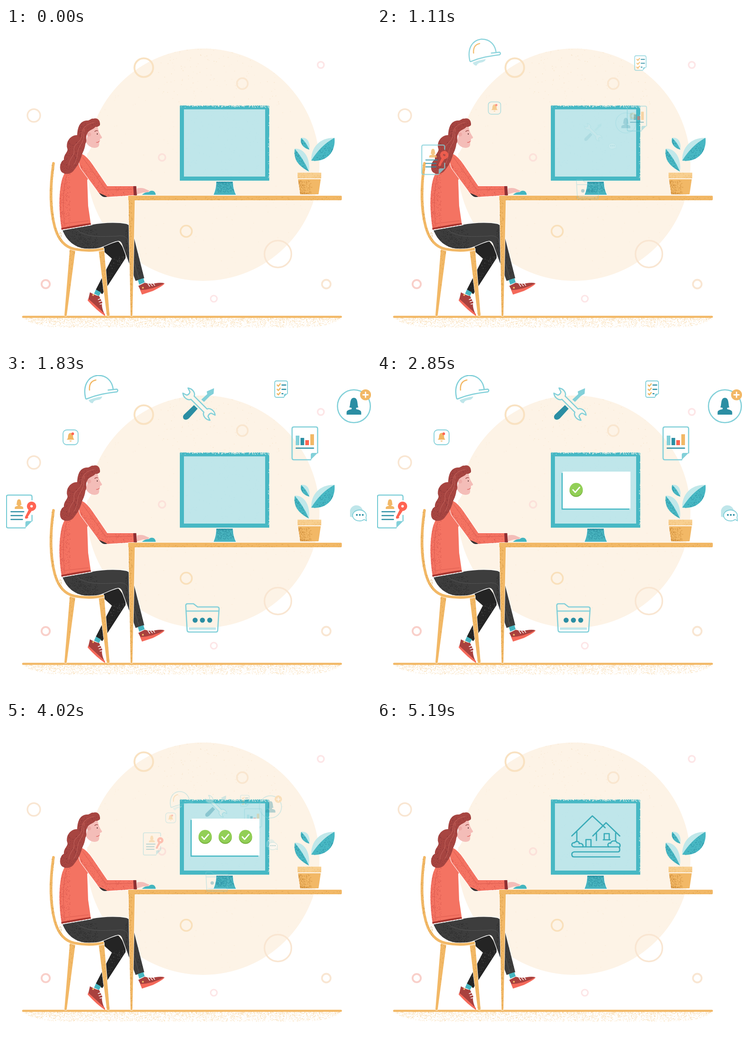
An HTML page with a canvas that plays this animation: 800x700 px, repeating every 6330 ms.

```html
<!DOCTYPE html>
<html lang="en">
<head>
<meta charset="utf-8">
<title>Working at a desk</title>
<style>
  html, body { margin: 0; width: 100%; height: 100%; overflow: hidden; background: #fff; }
  canvas, svg { position: absolute; left: 0; top: 0; width: 800px; height: 700px; }
  svg * { stroke-linecap: round; stroke-linejoin: round; }
  .line { fill: none; stroke: #82d0d9; stroke-width: 2.6; }
  .thin { stroke-width: 1.8; }
  .ink { fill: none; stroke: #2b8ea3; stroke-width: 2.6; }
  .teal { fill: #82d0d9; }
  .pale { fill: #bfe6ea; }
  .dark { fill: #2b8ea3; }
  .gold { fill: #f2b866; }
  .red { fill: #ff6452; }
  .goldline { fill: none; stroke: #f2b866; stroke-width: 2.6; }
  .white { fill: none; stroke: #fff; stroke-width: 2.8; }
  .check { fill: #92cf56; }
  .check-shade { fill: #78b33f; }
  .house { fill: none; stroke: #3aabb8; stroke-width: 2.7; }
</style>
</head>
<body>
<canvas id="scene" width="800" height="700"></canvas>
<svg viewBox="0 0 800 700">
  <g id="icons"></g>
  <g id="card">
    <path fill="#45b8c4" d="M404.500 215H553V295.500H404.500Z"/>
    <path fill="#fff" d="M407 212H555.500V293H407Z"/>
  </g>
  <g id="checks"></g>
  <g id="house" class="house">
    <path d="M427 250L472 206L500 232M438 241V262M473 250L502 221L532 250M481 244V260M523 244V260"/>
    <path d="M498 258V245H509V258M496 258.500H511M458 274V258H469V274"/>
    <path d="M433 274C425 274 425 264 433 265C436 260 444 262 443 267C449 265 453 270 451 274"/>
    <path d="M508 274C504 270 507 264 512 266C514 259 525 260 526 265C532 265 534 270 532 274"/>
    <path d="M433 274H529Q532 275 532 280Q532 285 528 285H432Q427 286 427 290.500Q427 296 432 296H532"/>
  </g>
</svg>
<script>
const LOOP = 6330, STEP = 30;
const ctx = document.getElementById('scene').getContext('2d');

let seed = 7;
const random = () => (seed = (seed * 16807) % 2147483647) / 2147483647;

function shape(d, color, edge = 0) {
  const path = new Path2D(d);
  if (edge) stroke(path, '#fff', edge);
  ctx.fillStyle = color;
  ctx.fill(path);
  return path;
}

function stroke(d, color, width) {
  ctx.strokeStyle = color;
  ctx.lineWidth = width;
  ctx.lineCap = ctx.lineJoin = 'round';
  ctx.stroke(d instanceof Path2D ? d : new Path2D(d));
}

// Specks inside a path, denser towards (x0, y0) as the biases grow.
function grain(path, color, count, [x0, y0, x1, y1], biasX = 1, biasY = 1, size = 1.3) {
  ctx.save();
  ctx.clip(path);
  ctx.fillStyle = color;
  for (let i = 0; i < count; i++) {
    const x = x0 + (x1 - x0) * random() ** biasX;
    const y = y0 + (y1 - y0) * random() ** biasY;
    const s = size * (0.6 + random() * 0.6);
    ctx.fillRect(x, y, s, s);
  }
  ctx.restore();
}

function drawBackdrop() {
  const disc = new Path2D();
  disc.arc(432, 300, 255, 0, 7);
  ctx.fillStyle = '#fdf3e6';
  ctx.fill(disc);
  grain(disc, '#faead6', 300, [177, 45, 687, 555]);
  grain(disc, '#f6e2c8', 170, [600, 45, 330, 170], 1, 1.7);

  const rings = [
    [302, 87, 20.5, 4, '#f9e2c2'], [518, 122, 12, 3.5, '#f9e6cf'], [61, 192, 14, 3.5, '#f9e6d2'],
    [690, 81, 7, 3.5, '#fde6e7'], [342, 284, 7.5, 3.5, '#fce1da'], [395, 446, 12.5, 3.6, '#f9e0bb'],
    [596, 496, 29.5, 3.5, '#f9e6d2'], [87, 562, 9, 4, '#f9d0ca'], [702, 562, 9.5, 3.8, '#f9e6d2'],
    [455.5, 594, 7, 3.2, '#fde6e7']
  ];
  for (const [x, y, r, width, color] of rings) {
    const ring = new Path2D();
    ring.arc(x, y, r, 0, 7);
    stroke(ring, color, width);
  }

  const shade = new Path2D('M36 636H736C720 650 690 657 650 657H120C80 657 50 648 36 636Z');
  grain(shade, '#f6d5a3', 3200, [36, 636, 736, 658], 1, 1.6, 1.1);
  stroke('M37.500 633.700H734', '#f2b866', 4.600);
}

function drawLegs() {
  const back = shape('M214 478L246 468Q264 488 262 505L211 584L197 574L232 506L214 490Z', '#242424');
  grain(back, '#505050', 260, [264, 500, 205, 590], 2);
  shape('M197 574L208 580L204 588L193 583Z', '#46b5c0');
  shape('M184 580Q196 587 204 588L211 602Q208 612 217 630L180 597Z', '#a9413e');
  stroke('M202 596L209 593M204 601L210 599M206 606L211 605', '#fff', 1.500);
  shape('M180 594Q196 608 217 628V632Q199 620 179 598Z', '#f4695a');
  shape('M191 584a2 2 0 1 0 .1 0Z', '#f2b866');

  const front = shape('M124 444L187 432C212 427 244 426 264 430Q275 434 278 450L303 549L284 555L264 500L254 473Q251 467 246 467C228 470 215 482 193 485C160 487 136 474 124 444Z', '#3d3d3d', 2.500);
  grain(front, '#2a2a2a', 420, [200, 488, 130, 440], 1, 2);
  grain(front, '#2a2a2a', 260, [262, 550, 300, 440], 2);
  stroke('M155 443C180 462 212 457 240 457Q262 453 266 464L291 549', '#555', 1);
  shape('M289 553L301 549L304 558L292 563Z', '#46b5c0');
  shape('M290 566L304 559Q317 563 328 560Q340 558 347 560Q336 570 296 578Z', '#a9413e');
  stroke('M311 561L315 567M317 562L321 566M323 561L326 565', '#fff', 1.500);
  shape('M294 575Q322 574 348 560Q346 565 322 577L298 585Z', '#f4695a');
  shape('M300 568a2 2 0 1 0 .1 0Z', '#f2b866');
}

function drawChair() {
  const legs = [shape('M140 484L152 487L133 631Q131 634 128 631Z', '#f2b866', 1.500),
                shape('M203 487L215 486L227 631Q224 634 221 631Z', '#f2b866', 1.500)];
  grain(legs[0], '#d9a04e', 90, [138, 486, 154, 632], 1, 1.500);
  grain(legs[1], '#d9a04e', 80, [204, 486, 228, 632], 1, 1.500);
  const seat = 'M104 297C96 350 97 400 107 437C115 465 130 481 150 485C170 489 195 489 212 485';
  stroke(seat, '#fff', 7.500);
  stroke(seat, '#f2b866', 5.800);
  const backrest = new Path2D('M101 295L107 297Q95 390 112 440L150 482V488Q114 478 104 440Q90 380 101 295Z');
  grain(backrest, '#d39a47', 240, [94, 296, 122, 480]);
}

function drawWoman() {
  const torso = shape('M164 276C146 288 126 314 121 340C114 376 118 415 122 442L186 431L180 390L178 333L190 322Z', '#f47362');
  grain(torso, '#d9594f', 380, [115, 442, 140, 320], 2);
  stroke('M132 326C124 362 125 395 128 429L181 423', '#dd5c50', 1);
  shape('M121 439Q150 433 185 428L187 432L122 443Z', '#a8352f');
  ctx.setLineDash([5, 2]);
  stroke('M125 443L188 432', '#fff', 1.800);
  ctx.setLineDash([]);

  shape('M173 252L188 260L180 274L167 276Z', '#fff');
  const sleeve = shape('M166 276Q178 282 190 300L222 347H280V367L216 371Q208 370 200 357L164 308Q155 290 166 276Z', '#f47362', 2);
  grain(sleeve, '#d9594f', 300, [280, 372, 165, 290], 1, 2);
  grain(sleeve, '#d9594f', 130, [160, 300, 215, 370], 1.600, 1);
  stroke('M168 284L219 355L277 354', '#dd5c50', 1);
  shape('M204 362Q214 366 222 370Q212 374 204 362Z', '#343434');
  shape('M279 347L285.500 347L287 367L280 368Z', '#8f3033');

  shape('M182 224L200 213Q202 224 205 231L210.500 240Q210 243 206 243L206 248L204 252Q206 262 195 263Q182 263 175 250Z', '#f4bdb8');
  shape('M182 229a4.500 4.500 0 1 0 .1 0Z', '#efaca8');
  stroke('M194.500 227Q197.500 224.500 201 225.500', '#8f3a36', 1.200);
  stroke('M200 232V233', '#532c2b', 1.900);
  stroke('M198 251Q201 251.500 204 249', '#dc5d58', 1.100);
  const hair = shape('M206 213C207 202 200 196 191 199C187 197 183 204 177 203C164 204 157 214 156 235C142 235 131 248 134 263C138 272 126 276 127 289C118 294 116 309 122 316C130 323 143 321 149 312C158 301 164 289 167 276C171 268 173 262 174 254C179 246 173 241 178 232C183 222 190 224 196 217Q203 217 206 213Z', '#a74541');
  grain(hair, '#853437', 380, [116, 320, 170, 200], 1.900, 1);
  grain(hair, '#8d393a', 130, [206, 205, 158, 245]);
  stroke('M194 207C174 210 166 221 166 238C164 251 147 254 149 269C152 278 137 288 138 301M172 222C168 235 174 242 162 259C154 271 160 282 149 300', '#c06059', 1.100);
}

function drawDesk() {
  const leg = shape('M268.500 368H282.500L277 632H273Z', '#f2b866', 1.500);
  grain(leg, '#d39a47', 260, [268, 378, 276, 632], 1.500);
  const top = shape('M268 368H734Q736 368 736 370V376Q736 378 734 378H268Z', '#f2b866');
  grain(top, '#d9a14f', 430, [268, 379, 736, 370], 1, 3.200);

  shape('M287 352Q299 349 307 354L314 357Q314 361 300 361L287 365Z', '#f4bdb8');
  shape('M298 366Q304 360 313 360Q317 355 324 358Q328 361 328 366Z', '#43b5bf');
}

function drawMonitor() {
  const frame = shape('M381 170H577V335H381Z', '#47b8c4');
  grain(frame, '#fdf7ee', 150, [381, 169, 577, 173], 1, 1.700, 1.500);
  grain(frame, '#fdf7ee', 70, [578, 170, 574, 335], 1.800, 1, 1.400);
  const screen = shape('M390 178.500H568V326H390Z', '#bfe6ea');
  grain(screen, '#bae3e8', 300, [390, 178, 568, 326]);
  const stand = shape('M461 337H497Q498 356 504 366H455Q461 352 461 337Z', '#49b4bf', 2);
  grain(stand, '#2f93a3', 300, [460, 337, 504, 360], 1, 2);
}

function drawPlant() {
  const pot = shape('M640 331H690L685 365H645Z', '#f2b866');
  grain(pot, '#cf8f3d', 300, [640, 366, 670, 334], 2, 1.500);
  const rim = shape('M639 317.500H691V330H639Z', '#f8cf90');
  grain(rim, '#f0c07a', 90, [639, 330, 691, 317], 1, 1.500);
  stroke('M640 331H690', '#fff', 1.500);

  shape('M669 291C668 262 688 240 720 241Z', '#c0e8ea');
  const big = shape('M669 291Q690 257 720 241C723 271 704 295 669 291Z', '#47b7c3');
  shape('M633 265C652 263 668 285 664 315Z', '#c0e8ea');
  const middle = shape('M633 265Q652 287 664 315C643 304 629 290 633 265Z', '#47b7c3');
  shape('M647 241C661 239 667 251 665 267Z', '#c0e8ea');
  const small = shape('M647 241Q658 251 665 267C652 264 643 253 647 241Z', '#47b7c3');
  grain(big, '#2b8fa1', 160, [721, 292, 675, 245], 1.200, 1.800);
  grain(middle, '#2b8fa1', 140, [632, 314, 660, 270], 1.700, 1);
  grain(small, '#2b8fa1', 50, [645, 266, 664, 243], 1.500, 1);
}

[drawBackdrop, drawLegs, drawChair, drawWoman, drawDesk, drawMonitor, drawPlant].forEach(draw => draw());

const path = (cls, d) => `<path class="${cls}" d="${d}"/>`;
const dot = (cls, x, y, r) => `<circle class="${cls}" cx="${x}" cy="${y}" r="${r}"/>`;
const box = (cls, x, y, w, h, r = 0) => `<rect class="${cls}" x="${x}" y="${y}" width="${w}" height="${h}" rx="${r}"/>`;
const fold = (x, y, f) => path('teal', `M${x - f} ${y}V${y - f + 4}Q${x - f} ${y - f} ${x - f + 4} ${y - f}H${x}Z`);
const sheet = (x, y, w, h, f, cls = 'line') =>
  path(cls, `M${x + w - f} ${y + h}H${x + 4}q-4 0 -4 -4V${y + 4}q0 -4 4 -4H${x + w - 4}q4 0 4 4V${y + h - f}`) + fold(x + w, y + h, f);
const bust = (cls, x, y, k) =>
  `<g transform="translate(${x} ${y}) scale(${k})">` +
  path(cls, 'M-10 4C-7 0 -10 -17 0 -17S7 0 10 4L5 5V8C11 9 16 11 16 15V20H-16V15C-16 11 -11 9 -5 8V5Z') + '</g>';

const icons = [
  { at: [209, 31], start: 375, art:
    path('line', 'M174 49C169 25 178 4 200 1C221 0 233 14 235 32L243 31Q247 34 243 37C219 40 200 43 178 52Q174 54 174 48M235 32L224 33') +
    path('goldline', 'M183 33C182 20 187 13 197 11') +
    path('pale', 'M181 55Q196 49 211 47Q210 54 199 55Q192 56 190 62Q184 62 181 55Z') },
  { at: [33, 299.5], start: 465, art:
    path('line', 'M42 335.500H5q-4 0 -4 -4V267.500q0 -4 4 -4H53q4 0 4 4V274M57 308V320') + fold(57.500, 335.500, 15) +
    bust('gold', 28.500, 282.500, 0.580) +
    path('ink', 'M11 300H39M11 308.500H36M11 317H36') +
    path('red', 'M51 293L57 297L48 311L49 313L46 315H42Q41 311 43 309Z') +
    `<circle cx="56" cy="288" r="6.500" fill="none" stroke="#ff6452" stroke-width="7.500"/>` },
  { at: [602.5, 31], start: 465, art:
    sheet(589, 13, 28, 36, 8, 'line thin') +
    [22, 31.500, 41].map(y => path('goldline', `M594.500 ${y}l2.500 2.500l4 -5`) +
      path('ink thin', `M605 ${y}H${y > 40 ? 607 : 613}`)).join('') },
  { at: [141, 136], start: 555, art:
    box('line thin', 125, 120.500, 33, 32.500, 8) +
    path('gold', 'M133 142Q136 140 136 134Q137 127 141.500 127Q146 127 147 134Q147 140 150 142ZM138.500 144H144.500Q141.500 148 138.500 144Z') +
    dot('red', 146.200, 129, 3) },
  { at: [655, 150], start: 645, art:
    sheet(627, 114, 56, 72, 15) +
    box('teal', 635, 133, 8, 21) + box('dark', 645.500, 138, 8, 16) +
    box('red', 656, 143, 8, 11) + box('gold', 667, 130, 8, 24) + path('ink', 'M636 160.500H674') },
  { at: [430, 532], start: 735, art:
    path('line', 'M394 506Q394 502 398 502H411L420 509H463Q467 509 467 513L464 560Q464 564 460 564H402Q397 564 397 560ZM395 518H467') +
    [414.500, 430.500, 446.500].map(x => dot('dark', x, 538, 5.500)).join('') + box('pale', 401, 554, 59, 5) },
  { at: [762, 68], start: 825, art:
    dot('line', 762.500, 68.500, 36) + bust('dark', 762.500, 67, 1) +
    dot('gold', 788, 43.500, 12) + path('white', 'M782.500 43.500H793.500M788 38V49') },
  { at: [772, 303], start: 915, art:
    path('pale', 'M754 311V300A14 13 0 1 1 768 312H760Z') +
    `<path class="line thin" style="fill:#fff" d="M785 317L790 320L789 312A15 12 0 1 0 785 317Z"/>` +
    [769, 775.500, 782].map(x => dot('dark', x, 307, 2)).join('') },
  { at: [422, 63], start: 915, art:
    path('dark', 'M412 66L420 74L401 95Q396 100 390 97Q386 92 390 87Z') +
    path('teal', 'M428 54L441 42L440 36L456 29L455 41L447 46L434 59Z') +
    `<g transform="translate(423 64) rotate(45)"><path class="line" style="fill:#fdf6ec" d="M-20 -5C-22 -11 -33 -15 -42 -8L-33 -5Q-30 0 -33 5L-42 8C-33 15 -22 11 -20 5H20C22 11 33 15 42 8L33 5Q30 0 33 -5L42 -8C33 -15 22 -11 20 -5Z"/></g>` }
];

const checks = [436.500, 480.500, 525].map((x, i) => ({
  at: [x, 252], keys: [[2670 + i * 240, 0], [2850 + i * 240, 1], [4200, 1], [4380, 0]],
  art: dot('check-shade', x, 253, 14.500) + dot('check', x, 251, 14.300) + path('white', `M${x - 7} 252l5 5.500l9.500 -11`)
}));

function fill(id, parts) {
  const group = document.getElementById(id);
  group.innerHTML = parts.map(part => `<g>${part.art}</g>`).join('');
  parts.forEach((part, i) => part.node = group.children[i]);
}
fill('icons', icons);
fill('checks', checks);

// Eased value along a table of [time, value] keys.
function track(t, keys) {
  if (t <= keys[0][0]) return keys[0][1];
  for (let i = 1; i < keys.length; i++) {
    const [t0, v0] = keys[i - 1], [t1, v1] = keys[i];
    if (t < t1) {
      const u = (t - t0) / (t1 - t0);
      return v0 + (v1 - v0) * u * u * (3 - 2 * u);
    }
  }
  return keys[keys.length - 1][1];
}

function place(node, [cx, cy], scale, opacity, x = cx, y = cy) {
  node.style.display = opacity > 0 && scale > 0 ? '' : 'none';
  node.setAttribute('transform', `translate(${x} ${y}) scale(${scale}) translate(${-cx} ${-cy})`);
  node.setAttribute('opacity', opacity);
}

const card = document.getElementById('card');
const house = document.getElementById('house');
const origin = [480, 250];

function render(t) {
  for (const { node, at, start } of icons) {
    const p = track(t, [[start, 0], [start + 915, 1], [3780, 1], [4180, 0]]);
    const [x, y] = at.map((v, i) => origin[i] + (v - origin[i]) * p);
    place(node, at, 0.5 + 0.5 * p, p, x, y);
  }
  place(card, [480, 254], track(t, [[2250, 0], [2430, 1.1], [2520, 1], [4400, 1], [4620, 0]]), 1);
  for (const { node, at, keys } of checks) place(node, at, track(t, keys), 1);
  place(house, [480, 250], 1, track(t, [[4890, 0], [5190, 1]]));
}

const begin = performance.now();
function tick() {
  const t = (performance.now() - begin) % LOOP;
  render(Math.floor(t / STEP) * STEP);
  requestAnimationFrame(tick);
}
tick();
</script>
</body>
</html>
```
